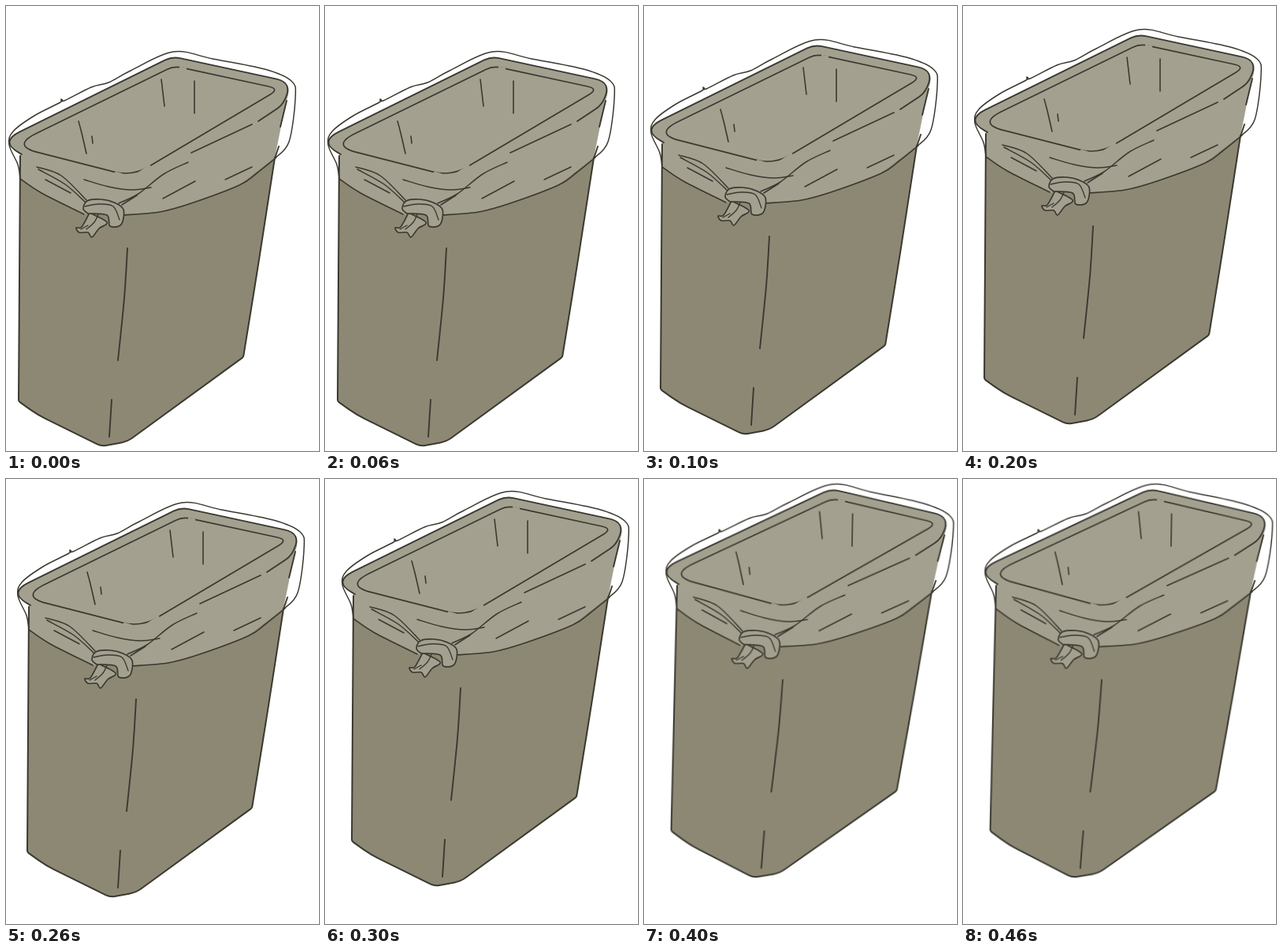
An HTML page for the animation above (500 ms loop, 397 by 564 pixels).

```html
<!DOCTYPE html>
<html lang="en">
<head>
<meta charset="utf-8">
<title>Bin</title>
<style>
  html, body { margin: 0; width: 100%; height: 100%; overflow: hidden; background: #fff; }
  svg { display: block; width: 397px; height: 564px; }
  path { fill: none; stroke-linecap: round; stroke-linejoin: round; }
</style>
</head>
<body>
<svg viewBox="0 0 397 564"><g id="bin"></g></svg>
<script>
const bin = document.getElementById('bin');
const BODY = '#8d8874', LINER = '#a3a08f', INK = '#3a3930';

const parse = text => text.split(' ').map(s => s.split(',').map(Number));

// Smooth curve through a few key points.
function curve(text) {
  const p = parse(text);
  let d = 'M' + p[0];
  for (let i = 0; i < p.length - 1; i++) {
    const a = p[i - 1] || p[i], b = p[i], c = p[i + 1], e = p[i + 2] || c;
    const out = b.map((v, k) => v + (c[k] - a[k]) / 6);
    const into = c.map((v, k) => v - (e[k] - b[k]) / 6);
    d += `C${out} ${into} ${c}`;
  }
  return d;
}

// Straight edges; each "x,y,r" corner is rounded over a distance r.
function edges(text, closed) {
  const p = parse(text), n = p.length;
  const toward = ([x, y, r = 0], [u, v]) => {
    const k = r / Math.hypot(u - x, v - y);
    return [x + (u - x) * k, y + (v - y) * k];
  };
  const parts = p.map((c, i) => {
    if (!closed && (i === 0 || i === n - 1)) return c.slice(0, 2).join();
    const before = toward(c, p[(i + n - 1) % n]), after = toward(c, p[(i + 1) % n]);
    return `${before}Q${c[0]},${c[1]} ${after}`;
  });
  return 'M' + parts.join('L') + (closed ? 'Z' : '');
}

function add(d, style) {
  const path = document.createElementNS('http://www.w3.org/2000/svg', 'path');
  path.setAttribute('d', d);
  Object.assign(path.style, style);
  bin.append(path);
}
const fill = (d, color) => add(d, { fill: color });
const ink = (d, width = 1.7) => add(d, { stroke: INK, strokeWidth: width });
const rub = text => add(curve(text), { stroke: LINER, strokeWidth: 3, strokeLinecap: 'butt' });
const strokes = (width, ...list) => list.forEach(s => ink(curve(s), width));

const rim = '20,188 -8,172,28 211,64,10 364,97,22 350,126,8 320,146';
const base = '18,190 16,501,2 40,518,12 121,558,6 154,552,8 301,445,2 320,328,40 341,192';
const hemL = '18,219 45,237 99,264';
const hemR = '343,192 318,212 296,227 235,250 195,261 149,265';

// Colour areas
fill(edges(base, true), BODY);
fill(edges('18,187 -8,172,28 211,64,10 364,97,22 355,122 341,192 296,227 235,250 195,261 149,265 99,264 45,237 18,219', true), LINER);

// Loose outer edge of the bag
strokes(1.5,
  '18,219 15,201 4,176 9,159 36,139 69,122 70,118 74,120 108,103 130,97 158,82 212,58 262,67 328,80 362,95 367,116 359,172 341,193');

// Rim, with gaps in the inner line
ink(edges(rim), 1.9);
ink(edges('7,177,35 213,76,10 347,105,14 160,216,24', true));
rub('220,78 229,80');
rub('138,211 148,214');
rub('167,213 183,202');
strokes(1.7, '312,150 235,186');

// Body
ink(edges(base), 2);
strokes(1.9, '356,120 348,153', '346,178 341,193', '154,307 150,370 142,449', '134,499 131,546');

// Inside creases and liner folds
strokes(1.6, '92,146 96,161 102,187', '109,165 110,174', '197,93 201,127', '239,95 239,136', hemL, hemR);
strokes(1.5,
  '99,220 130,229 160,233 184,230',
  '143,250 168,238 200,213 231,198',
  '147,252 166,240', '199,244 240,222', '278,220 312,204',
  '39,204 70,215 102,246', '41,207 75,226 101,249', '50,220 82,237');

// Knot
const tail = '106,262 96,280 89,281 93,287 104,287 109,293 118,282 128,274 106,262';
const knot = '104,263 98,257 103,247 120,245 137,249 149,258 146,277 132,279 128,265 104,263';
for (const part of [tail, knot]) {
  fill(curve(part), LINER);
  ink(curve(part));
}
strokes(1.4, '100,254 118,251 136,254 144,271', '117,264 112,274 102,283', '95,283 104,278');

// One held pose per 100 ms: x, y, turn in degrees
const poses = [[0, 0, 0], [5, -15, 0], [11, -28, 0], [18, -42, 0], [27.3, -55, 1]];
const frames = [...poses, poses[0]].map(([x, y, turn], i) => ({
  offset: i / poses.length,
  transform: `translate(${x}px, ${y}px) rotate(${turn}deg)`,
  easing: 'steps(1, end)'
}));
bin.animate(frames, { duration: 500, iterations: Infinity });
</script>
</body>
</html>
```
